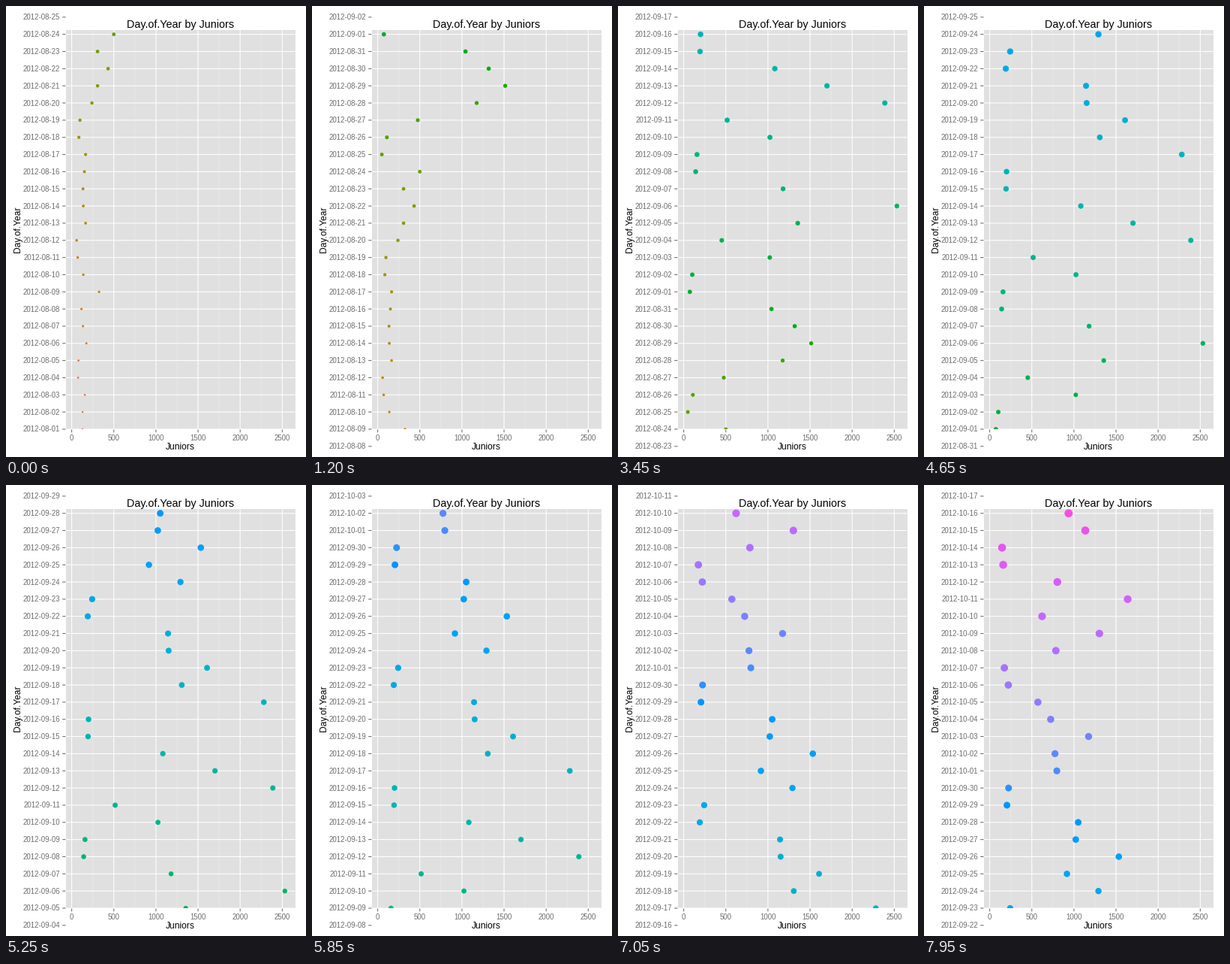
Animation of 400 by 600 pixels, one loop 8000 ms. Source, as a matplotlib script:

```python
import numpy as np
import matplotlib.pyplot as plt
from matplotlib.animation import FuncAnimation
from matplotlib.patches import Rectangle

W, H, DPI = 400, 600, 100
PT = 72 / DPI                      # points per pixel
LEFT, RIGHT, TOP, BOTTOM = 79.5, 385.5, 32, 563
ROW = 22.84                        # pixels per day
TICK_MS, STEP_MS, LOOP_MS = 50, 150, 8000
START = np.datetime64("2012-08-01")
HUE_DAYS = 92
GAMMA = 1.22

JUNIORS = np.array([
    # August
    129, 129, 156, 76, 80, 174, 134, 116, 325, 138, 71, 58, 165, 138, 134, 151,
    165, 85, 98, 240, 307, 432, 307, 500, 49, 109, 476, 1175, 1514, 1318, 1042,
    # September
    73, 102, 1022, 452, 1354, 2531, 1180, 142, 158, 1024, 516, 2388, 1701, 1082,
    194, 200, 2281, 1307, 1607, 1151, 1144, 191, 243, 1291, 917, 1533, 1022,
    1051, 205, 224,
    # October
    797, 775, 1174, 724, 572, 221, 174, 786, 1302, 622, 1638, 803, 160, 147,
    1135, 937,
])

plt.rcParams["font.family"] = "Liberation Sans"


def x_pos(value):
    return 87.6 + value * 0.1123


def y_pos(row):
    return BOTTOM - row * ROW


def gray(level):
    return (level ** GAMMA,) * 3


def hcl(hue, chroma=100, lum=65):
    """Polar LUV to RGB, with the darker display gamma."""
    y = ((lum + 16) / 116) ** 3
    u = chroma * np.cos(np.radians(hue)) / (13 * lum) + 0.1978
    v = chroma * np.sin(np.radians(hue)) / (13 * lum) + 0.4683
    x = 9 * y * u / (4 * v)
    z = y * (12 - 3 * u - 20 * v) / (4 * v)
    linear = np.array([
        3.2405 * x - 1.5371 * y - 0.4985 * z,
        -0.9693 * x + 1.8760 * y + 0.0416 * z,
        0.0556 * x - 0.2040 * y + 1.0572 * z,
    ]).clip(0, 1)
    srgb = np.where(linear <= 0.0031308, 12.92 * linear,
                    1.055 * linear ** (1 / 2.4) - 0.055)
    return srgb.clip(0, 1) ** GAMMA


fig = plt.figure(figsize=(W / DPI, H / DPI), dpi=DPI, facecolor="white")
ax = fig.add_axes([0, 0, 1, 1])
ax.set_xlim(0, W)
ax.set_ylim(H, 0)
ax.axis("off")


def line(xs, ys, color, width, z):
    return ax.plot(xs, ys, color=color, lw=width * PT, zorder=z, snap=False,
                   solid_capstyle="butt")[0]


def text(x, y, label, size, color="black", ha="center", **kw):
    return ax.text(x, y, label, fontsize=size * PT, color=color, ha=ha,
                   va="baseline", zorder=6, **kw)


panel = Rectangle((LEFT, TOP), RIGHT - LEFT, BOTTOM - TOP, fc=gray(0.898),
                  lw=0, zorder=1)
ax.add_patch(panel)

for value in range(250, 2500, 500):
    line([x_pos(value)] * 2, [TOP, BOTTOM], gray(0.949), 0.53, 2)

for value in range(0, 2501, 500):
    x = x_pos(value)
    line([x, x], [TOP, BOTTOM], "white", 1.07, 3)
    line([x, x], [BOTTOM, BOTTOM + 4.3], gray(0.5), 1.07, 3)
    text(x, 578, str(value), 9.6, gray(0.5))

rows = range(-1, 25)
marks, labels = [], []
for row in rows:
    y = y_pos(row)
    if 0 <= row <= 23:
        line([LEFT, RIGHT], [y, y], "white", 1.07, 3)
    marks.append(line([LEFT - 4.3, LEFT], [y, y], gray(0.5), 1.07, 3))
    labels.append(text(72, y + 3.5, "", 9.6, gray(0.5), ha="right"))

days = np.arange(len(JUNIORS))
radii = 1.15 + 0.0565 * days
dots = ax.scatter(x_pos(JUNIORS), y_pos(days), s=(2 * radii * PT) ** 2,
                  c=[hcl(15 + 360 * d / HUE_DAYS) for d in days],
                  linewidths=0, zorder=5)
dots.set_clip_path(panel)

text(232.3, 29, "Day.of.Year by Juniors", 14.4)
text(232.3, 590, "Juniors", 12)
text(19.3, 297.5, "Day.of.Year", 12, rotation=90, rotation_mode="anchor")


def update(frame):
    first = frame * TICK_MS // STEP_MS
    dots.set_offsets(np.column_stack([x_pos(JUNIORS), y_pos(days - first)]))
    for row, mark, label in zip(rows, marks, labels):
        day = first + row
        mark.set_visible(day >= 0)
        label.set_text(str(START + day) if day >= 0 else "")
    return [dots, *marks, *labels]


anim = FuncAnimation(fig, update, frames=LOOP_MS // TICK_MS, interval=TICK_MS,
                     repeat=True, repeat_delay=0, blit=False)
plt.show()
```
